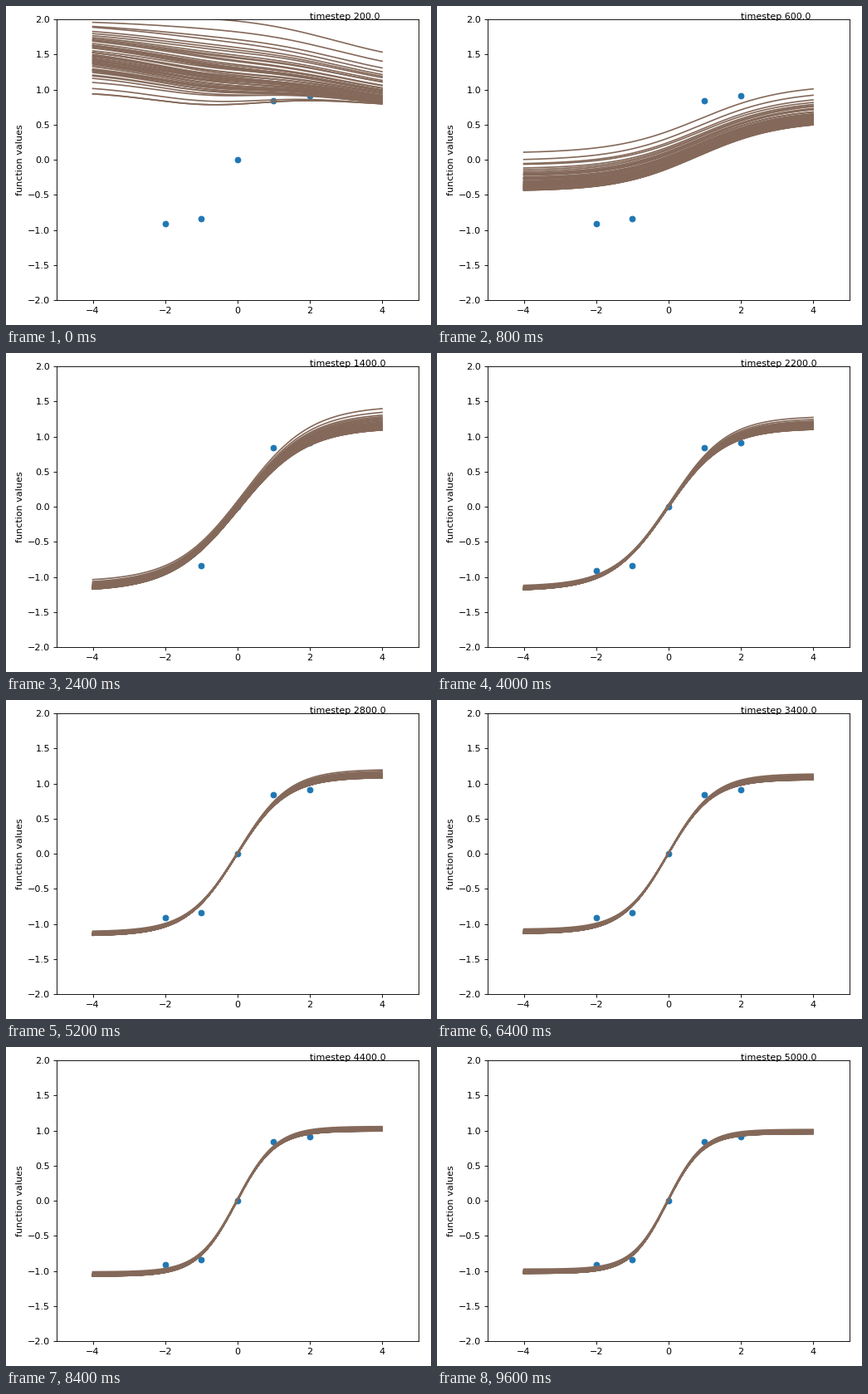
A matplotlib script that plays this animation: 512x384 px, repeating every 10 s.

```python
import numpy as np
import matplotlib.pyplot as plt
from matplotlib.animation import FuncAnimation

W, H, DPI = 512, 384, 80
FRAMES, INTERVAL = 25, 400
LINES = 52

plt.rcParams["font.family"] = "DejaVu Sans"
rng = np.random.default_rng(4)
x = np.linspace(-4, 4, 160)
mix = (x + 4) / 8

# Each line's place in the bundle (0 bottom, 1 top): crowded low, sparse high
skew = 0.985
rank = np.log(1 - skew * np.linspace(0, 1, LINES)) / np.log(1 - skew)


def jittered():
    return np.clip(rank + rng.normal(0, 0.02, LINES), 0, 1)


left, right = jittered(), jittered()


def bundle(step):
    """Tanh curves that rise, steepen and draw together as training goes on."""
    k = step / 1000
    early, late = np.exp(-5.6 * k), np.exp(-3 * k)
    warmup = np.exp(-2.1 * k ** 2)

    s = np.outer(left ** (1 - 1.85 * early), 1 - mix) + np.outer(right, mix)

    offset = -0.04 + 2.73 * early + s * (0.06 + 1.02 * np.exp(-1.3 * k))
    height = 1.33 - 0.067 * k - 1.69 * warmup
    height = height + (s - 0.5) * (0.13 * k * np.exp(-k ** 2 / 3) - 0.5 * late)
    centre = 5 * late - 0.05 + s * 0.22 * (1 - warmup) * np.exp(-0.35 * k)
    steepness = 0.35 + 0.132 * k
    dip = 0.5 * early * (1 - s) * np.exp(-((x + 0.8) / 2.3) ** 2)
    return offset + height * np.tanh(steepness * (x - centre)) - dip


fig = plt.figure(figsize=(W / DPI, H / DPI), dpi=DPI, facecolor="white")
ax = fig.add_axes([61 / W, 29.9 / H, 435.6 / W, 338 / H])
ax.set_xlim(-5, 5)
ax.set_ylim(-2, 2)
ax.set_xticks(range(-4, 5, 2))
ax.set_ylabel("function values")

px = np.arange(-2, 3)
ax.scatter(px, np.sin(px), color="tab:blue", zorder=1)
curves = [ax.plot([], [], color="#84695a", lw=1.5)[0] for _ in range(LINES)]
label = ax.text(2, 2, "")


def draw(k):
    step = 200.0 * (k + 1)
    for curve, y in zip(curves, bundle(step)):
        curve.set_data(x, y)
    label.set_text(f"timestep {step}")
    return curves + [label]


anim = FuncAnimation(fig, draw, frames=FRAMES, interval=INTERVAL,
                     repeat=True, repeat_delay=0, blit=False)
plt.show()
```
